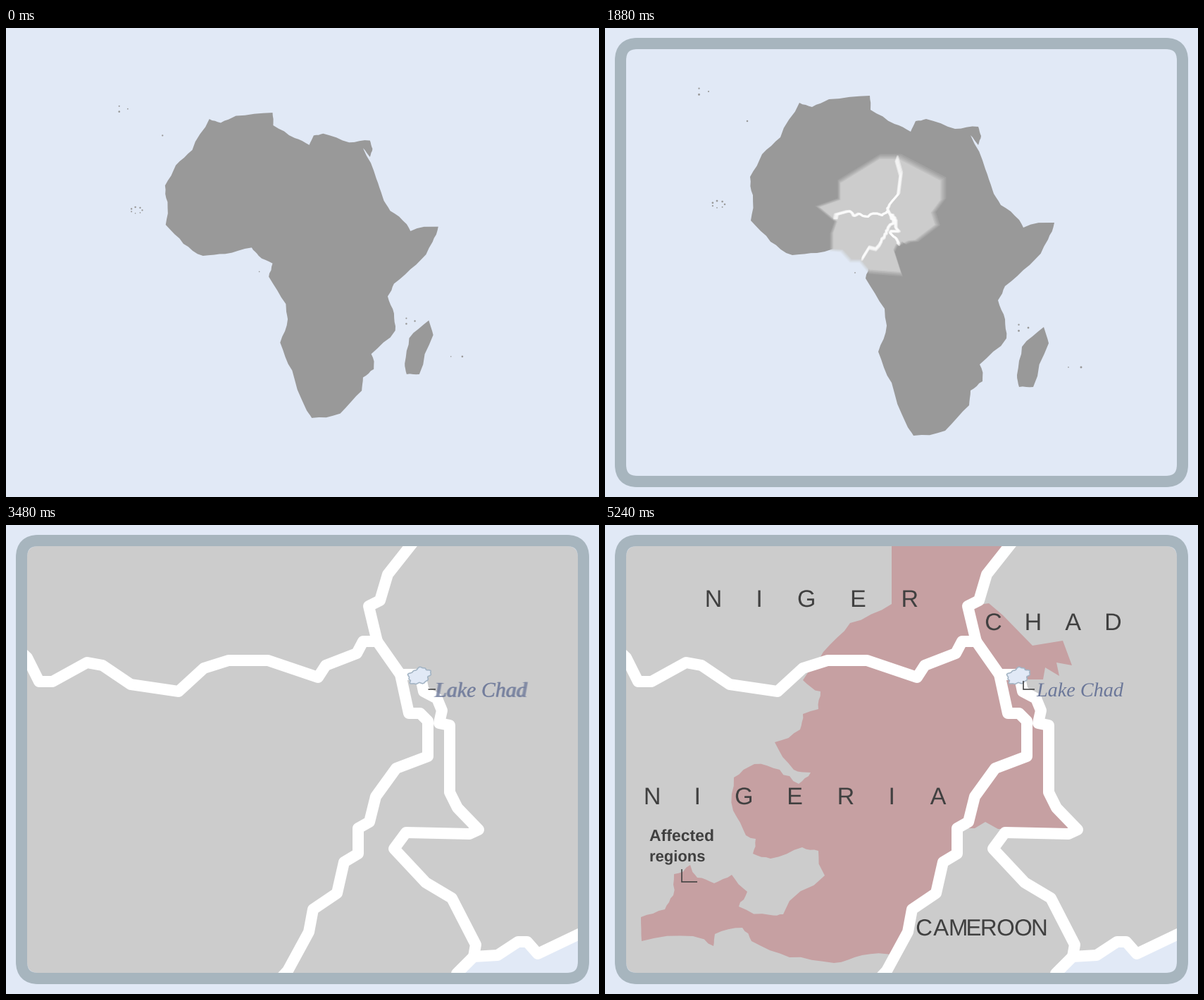
Recreate the animation shown at these times as a matplotlib script. Size 842 px wide and 665 px high, loop 6.04 s.

```python
import numpy as np
import matplotlib.pyplot as plt
from matplotlib.animation import FuncAnimation
from matplotlib.patches import FancyBboxPatch, PathPatch
from matplotlib.path import Path
from matplotlib.textpath import TextPath
from matplotlib.transforms import Affine2D

W, H, STEP, FRAMES = 842, 665, 40, 151
SEA, DARK, LIGHT, RED = "#e1e9f6", "#999999", "#cccccc", "#c6a0a2"
RING, INK, LAKE_INK = "#a7b5be", "#404040", "#6b7799"
SANS = {"family": "Liberation Sans"}
BOLD = {"family": "Liberation Sans", "weight": "bold"}
SERIF = {"family": "Liberation Serif", "style": "italic"}

ZOOM = 11.5
FIX = np.array([386.8, 271.2])        # point that stays put while zooming
rng = np.random.default_rng(7)

# Key points at continent scale; rough() adds the coast detail
COAST = [(276, 106), (294, 112), (318, 101), (376, 96), (377, 116), (411, 136), (434, 147),
         (441, 132), (456, 129), (497, 143), (530, 140), (534, 153), (530, 166), (519, 152),
         (540, 200), (550, 229), (562, 251), (588, 272), (594, 283), (638, 276), (629, 300),
         (603, 336), (568, 366), (558, 386), (568, 413), (570, 440), (532, 477), (536, 501),
         (519, 514), (517, 535), (483, 571), (438, 578), (428, 562), (407, 503), (388, 459),
         (400, 422), (397, 398), (370, 355), (376, 334), (354, 322), (343, 309), (301, 319),
         (266, 322), (235, 303), (207, 273), (210, 237), (206, 211), (223, 179), (249, 155)]
MADAGASCAR = [(623, 424), (630, 447), (608, 509), (588, 509), (585, 492), (592, 452)]
ISLANDS = [(138, 90, 3), (202, 132, 1), (161, 250, 7), (355, 347, 1), (368, 326, 1),
           (592, 425, 3), (667, 481, 2)]       # x, y, how many
BLOCK_NORTH = [(331, 308), (331, 288), (336, 274), (314, 256), (340, 247), (340, 226),
               (389, 196), (413, 196), (465, 223), (465, 247), (453, 263), (458, 278),
               (433, 297)]
BLOCK_SOUTH = [(406, 309), (415, 337), (376, 334), (365, 321), (354, 321), (343, 309)]

# Key points at zoomed scale
NIGER_SOUTH = [(-200, 260), (-190, 205), (-48, 165), (0, 160), (30, 188), (47, 222),
               (66, 222), (115, 195), (137, 199), (177, 226), (245, 236), (281, 203),
               (316, 192), (372, 192), (443, 216), (454, 199), (498, 182), (507, 165),
               (527, 165)]
NIGER_EAST = [(642, -560), (700, -352), (665, -76), (580, 22), (542, 70), (531, 107),
              (515, 115), (527, 165)]
CAMEROON_WEST = [(527, 165), (560, 212), (572, 267), (588, 267), (599, 278), (599, 328),
                 (554, 345), (525, 385), (516, 421), (500, 430), (500, 466), (480, 478),
                 (470, 522), (436, 545), (430, 577), (400, 632), (354, 682), (262, 660),
                 (170, 809)]
CAMEROON_EAST = [(560, 212), (588, 212), (593, 236), (612, 246), (619, 263), (615, 281),
                 (630, 284), (630, 379), (641, 401), (671, 432), (658, 438), (568, 436),
                 (551, 459), (596, 507), (633, 529), (667, 595), (664, 612)]
SOUTH_EAST = [(640, 636), (664, 612), (698, 610), (727, 591), (740, 591), (755, 608),
              (820, 577)]
RED_WEST = [(407, 112), (348, 139), (310, 180), (281, 220), (306, 236), (303, 261),
            (281, 268), (277, 290), (241, 308), (268, 347), (292, 351), (275, 367),
            (248, 347), (212, 339), (183, 358), (182, 405), (200, 440), (214, 445),
            (210, 466), (235, 473), (280, 457), (303, 462), (312, 497), (253, 552),
            (235, 553), (190, 541), (202, 520), (180, 496), (155, 508), (131, 500),
            (121, 482), (98, 495), (97, 525), (85, 545), (51, 556), (52, 590), (125, 583),
            (154, 597), (156, 580), (195, 571), (208, 590), (262, 613), (325, 621),
            (365, 610), (412, 610)]
RED_CHAD = [(593, 219), (622, 219), (625, 202), (645, 214), (641, 195), (663, 199),
            (650, 164), (607, 171), (565, 128), (545, 111), (531, 113), (538, 80)]
LAKE_LEADER = [(610, 233), (594, 233), (594, 221)]
AREA_LEADER = [(109, 488), (109, 506), (131, 506)]


def rough(pts, amount, levels=2):
    """Midpoint displacement: each segment gets a seeded sideways kink."""
    pts = np.asarray(pts, float)
    for _ in range(levels):
        step = np.diff(pts, axis=0)
        side = np.c_[-step[:, 1], step[:, 0]]
        mid = pts[:-1] + step / 2 + side * rng.normal(0, amount, (len(step), 1))
        both = np.empty((len(pts) + len(mid), 2))
        both[::2], both[1::2] = pts, mid
        pts = both
    return pts


def poly(pts):
    pts = list(pts)
    return Path(pts + pts[:1], closed=True)


def line(pts):
    return Path(np.asarray(pts, float))


def shrink(pts):
    return FIX + (np.asarray(pts, float) - FIX) / ZOOM


def round_box(x0, y0, x1, y1, r):
    style = f"round,pad=0,rounding_size={r}"
    return FancyBboxPatch((x0, y0), x1 - x0, y1 - y0, boxstyle=style).get_path()


def text(s, x, base, size, prop):
    flip = Affine2D().scale(1, -1).translate(x, base)
    return TextPath((0, 0), s, size=size, prop=prop).transformed(flip)


def spaced(s, cx, base, size, gap):
    """A word with an even gap between its letters, centred on cx."""
    glyphs, x = [], 0
    for ch in s:
        g = TextPath((0, 0), ch, size=size, prop=SANS)
        box = g.get_extents()
        glyphs.append(g.transformed(Affine2D().translate(x - box.x0, 0)))
        x += box.width + gap
    flip = Affine2D().scale(1, -1).translate(cx - (x - gap) / 2, base)
    return Path.make_compound_path(*glyphs).transformed(flip)


def islets():
    for x, y, n in ISLANDS:
        for k in range(n):
            turn = 2 * np.pi * k / n
            dx, dy = (9 * np.cos(turn), 5 * np.sin(turn)) if n > 1 else (0, 0)
            yield Path.circle((x + dx, y + dy), rng.uniform(0.8, 1.5))


def lake():
    a = np.linspace(0, 2 * np.pi, 48, endpoint=False)
    r = 1 + 0.1 * np.cos(5 * a + 1) + 0.07 * np.sin(11 * a)
    return poly(np.c_[587 + 15.5 * r * np.cos(a), 214 + 11 * r * np.sin(a) - 3 * np.cos(a)])


AFRICA = Path.make_compound_path(poly(rough(COAST + COAST[:1], 0.04)),
                                 poly(rough(MADAGASCAR + MADAGASCAR[:1], 0.04)), *islets())
BLOCK = poly([*BLOCK_NORTH, *shrink(SOUTH_EAST[::-1]), *BLOCK_SOUTH])
BORDERS = [line(shrink(b)) for b in (NIGER_SOUTH, NIGER_EAST, CAMEROON_WEST, CAMEROON_EAST)]
EDGE = line(shrink(SOUTH_EAST))
# The affected area shares its eastern side with the borders
AFFECTED = poly([(575, 20), (407, 20), *rough(RED_WEST, 0.06), *CAMEROON_WEST[14:8:-1],
                 (525, 430), (540, 421), (558, 431), *CAMEROON_EAST[9:1:-1], *RED_CHAD])
LAKE = lake()
FRAME = round_box(22, 22, 820, 643, 24)
INSIDE = round_box(30, 30, 812, 635, 16)
LABEL = [text("Affected", 63, 448, 23, BOLD), text("regions", 63, 477, 22, BOLD)]

# path, centre, start, colour
WORDS = [
    (text("Lake Chad", 613, 243, 28.2, SERIF), (674.5, 233), 3310, LAKE_INK),
    (spaced("NIGERIA", 271, 396, 34, 53), (271, 384), 4425, INK),
    (spaced("CAMEROON", 534.5, 582, 33, 2.5), (534.5, 570), 4690, INK),
    (spaced("CHAD", 636.5, 149, 34, 36), (636.5, 137), 4815, INK),
    (spaced("NIGER", 294, 116, 34, 54), (294, 104), 5000, INK),
]


def ramp(t, a, b):
    return min(max((t - a) / (b - a), 0), 1)


def smooth(p):
    return p * p * (3 - 2 * p)


def bounce(t, start, rise, back, low=0, peak=1.1):
    up = 1 - (1 - ramp(t, start, start + rise)) ** 2
    down = smooth(ramp(t, start + rise, start + rise + back))
    return low + (peak - low) * up - (peak - 1) * down


def zoom(t):
    return 1.05 * ramp(t, 1600, 2260) ** 4.5 - 0.05 * smooth(ramp(t, 2260, 2480))


def block_size(t):
    if t < 1600:
        return bounce(t, 650, 380, 210)
    return 1 + (ZOOM - 1) * zoom(t)


def shutter(f, t):
    """Values seen while the shutter is open, largest first."""
    vals = sorted((f(t - d) for d in range(0, 40, 8)), reverse=True)
    if vals[0] - vals[-1] < 0.002:
        vals = [f(t)]
    return [v for v in vals if v > 0.01]


def about(c, s, dx=0):
    return Affine2D().translate(-c[0], -c[1]).scale(s).translate(c[0] + dx, c[1])


def trace(pts, p):
    """The first part p of a polyline."""
    pts = np.asarray(pts, float)
    along = np.r_[0, np.cumsum(np.hypot(*np.diff(pts, axis=0).T))]
    d = np.unique(np.r_[along[along < p * along[-1]], p * along[-1]])
    return line(np.c_[np.interp(d, along, pts[:, 0]), np.interp(d, along, pts[:, 1])])


fig = plt.figure(figsize=(W / 100, H / 100), dpi=100, facecolor=SEA)
ax = fig.add_axes([0, 0, 1, 1])
ax.set_xlim(0, W)
ax.set_ylim(H, 0)
ax.axis("off")


def draw(path, fill="none", edge="none", lw=0, alpha=1, tf=None, clip=None, join="round"):
    move = ax.transData if tf is None else tf + ax.transData
    p = PathPatch(path, fc=fill, ec=edge, lw=lw * 0.72, alpha=alpha, transform=move,
                  joinstyle=join, capstyle="round" if join == "round" else "butt",
                  snap=False)
    ax.add_patch(p)
    if clip is not None:
        p.set_clip_path(clip, ax.transData)


def draw_africa(t):
    sizes = shutter(lambda u: bounce(u, 0, 340, 290, 0.898, 1.046), t)
    fade = 1 - ramp(t, 2160, 2280)
    if fade > 0:
        for k, s in enumerate(sizes):
            draw(AFRICA, DARK, alpha=fade / (len(sizes) - k), tf=about((400.5, 332), s))


def block_views(t):
    """Size and transform of the four countries for each moment of the shutter."""
    for s in shutter(block_size, t):
        e = (s - 1) / (ZOOM - 1)
        tf = about((389.5, 266.5), s) if t < 1600 else about(FIX, s, 60 * e * (1 - e))
        yield s, tf


def draw_block(views):
    for k, (_, tf) in enumerate(views):
        draw(BLOCK, LIGHT, alpha=1 / (len(views) - k), tf=tf, clip=INSIDE)


def draw_borders(views):
    alpha = 0.45 if len(views) > 1 else 1
    for s, tf in views:
        for b in BORDERS + ([EDGE] if s > 6 else []):
            draw(b, edge="white", lw=min(2.5 * s, 16), alpha=alpha, tf=tf, clip=INSIDE)


def draw_affected(t):
    p = ramp(t, 3530, 4120)
    if p > 0:
        k = 994 - 570 * p
        wipe = poly([(k + 800, -1000), (k - 1600, 2000), (k + 4000, 2000), (k + 4000, -1000)])
        draw(AFFECTED, RED, clip=wipe)


def draw_leader(pts, p):
    if p > 0:
        draw(trace(pts, p), edge=INK, lw=1.6, join="miter")


def update(i):
    t = i * STEP
    for p in list(ax.patches):
        p.remove()
    draw_africa(t)
    views = list(block_views(t))
    draw_block(views)
    draw_affected(t)
    draw_borders(views)

    sizes = shutter(lambda u: bounce(u, 2810, 240, 150), t)
    for k, s in enumerate(sizes):
        draw(LAKE, SEA, "#a3b4c4", 1.6, 1 / (len(sizes) - k), about((586.5, 214), s))

    if t >= 1600:
        draw(FRAME, edge=RING, lw=16, alpha=ramp(t, 1560, 1840))

    draw_leader(LAKE_LEADER, ramp(t, 3420, 3580))
    draw_leader(AREA_LEADER, ramp(t, 4300, 4460))
    shown = ramp(t, 4240, 4400)
    if shown > 0:
        for part in LABEL:
            draw(part, INK, alpha=shown)
    for path, centre, start, color in WORDS:
        sizes = shutter(lambda u: bounce(u, start, 120, 80), t)
        for s in sizes:
            draw(path, color, alpha=0.38 if len(sizes) > 1 else 1, tf=about(centre, s))
    return ax.patches


anim = FuncAnimation(fig, update, frames=FRAMES, interval=STEP, init_func=lambda: [],
                     repeat=True, repeat_delay=0, blit=False)
plt.show()
```
